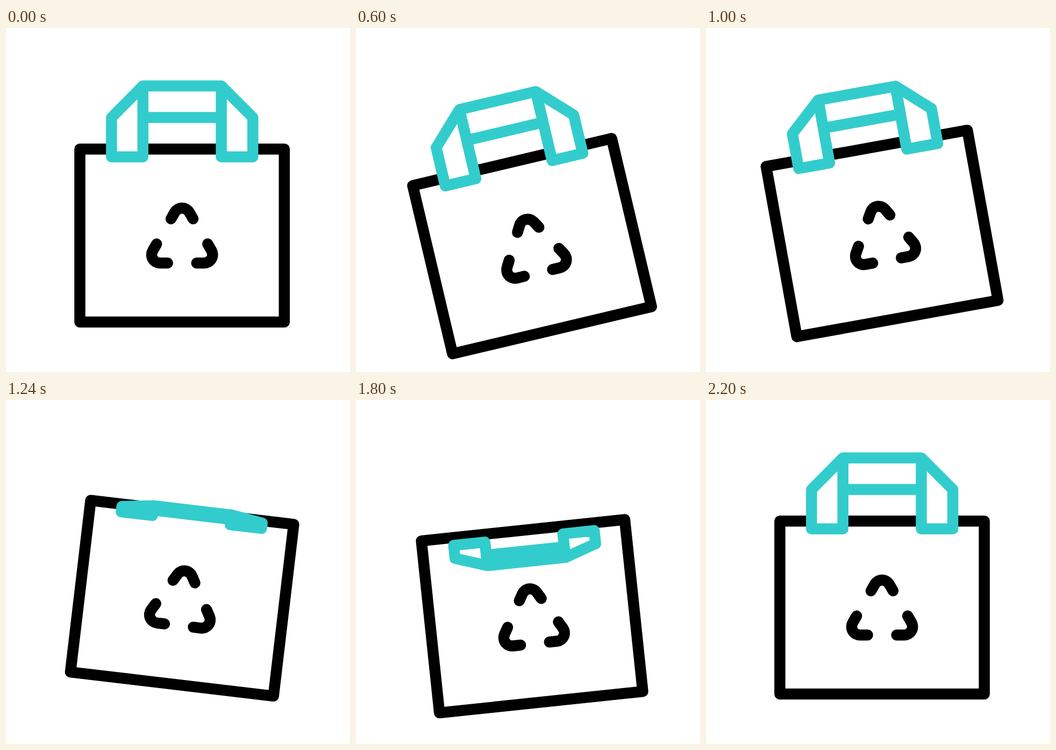
Animation, 640 px wide and 640 px high, one loop 2400 ms. Source, as an HTML page:

```html
<!DOCTYPE html>
<html lang="en">
<head>
<meta charset="utf-8">
<title>Swinging shopping bag</title>
<style>
  html, body { margin: 0; width: 100%; height: 100%; overflow: hidden; background: #fff; }
  svg { display: block; width: 100%; height: 100%; }
</style>
</head>
<body>
<svg viewBox="0 0 640 640" stroke="#000" stroke-width="20.5" stroke-linejoin="round" stroke-linecap="round" fill="#fff">
  <defs>
    <path id="arrow" fill="none" d="M307 355L314.1 342.7A15.5 15.5 0 0 1 340.9 342.7L348 355"/>
  </defs>
  <g id="bag">
    <rect x="137.4" y="225.3" width="380.4" height="321.6"/>
    <use href="#arrow"/>
    <use href="#arrow" transform="rotate(120 327.6 398)"/>
    <use href="#arrow" transform="rotate(240 327.6 398)"/>
    <path id="handle" stroke="#33cccc"/>
  </g>
</svg>
<script>
  const LOOP = 2400, STEP = 20;
  const bag = document.getElementById('bag');
  const handle = document.getElementById('handle');

  // Keys are [time, value] pairs.
  const tilt = [[200, 0], [800, -18], [1400, 12], [1800, -6], [2200, 0]];
  const lift = [[200, 0], [700, 22], [1200, -18], [1700, 18], [2200, 0]];
  const flip = [[900, 1], [1600, -0.8], [2200, 1]];

  function valueAt(keys, t) {
    if (t <= keys[0][0]) return keys[0][1];
    for (let i = 1; i < keys.length; i++) {
      const [t0, a] = keys[i - 1], [t1, b] = keys[i];
      if (t < t1) {
        const p = (t - t0) / (t1 - t0);
        return a + (b - a) * p * p * (3 - 2 * p);
      }
    }
    return keys[keys.length - 1][1];
  }

  // The handle folds about its lower edge while its line weight stays constant.
  function handlePath(fold) {
    const base = 239.8, mid = base - 73.2 * fold, top = base - 132 * fold;
    return `M254.7 ${mid}H400.6V${top}H254.7Z` +
      `M196.3 ${base}H254.7V${top}L196.3 ${mid}Z` +
      `M459.2 ${base}H400.6V${top}L459.2 ${mid}Z`;
  }

  function draw() {
    const t = Math.floor(performance.now() % LOOP / STEP) * STEP;
    bag.setAttribute('transform',
      `translate(0 ${valueAt(lift, t)}) rotate(${valueAt(tilt, t)} 327.6 386.1)`);
    handle.setAttribute('d', handlePath(valueAt(flip, t)));
    requestAnimationFrame(draw);
  }
  draw();
</script>
</body>
</html>
```
